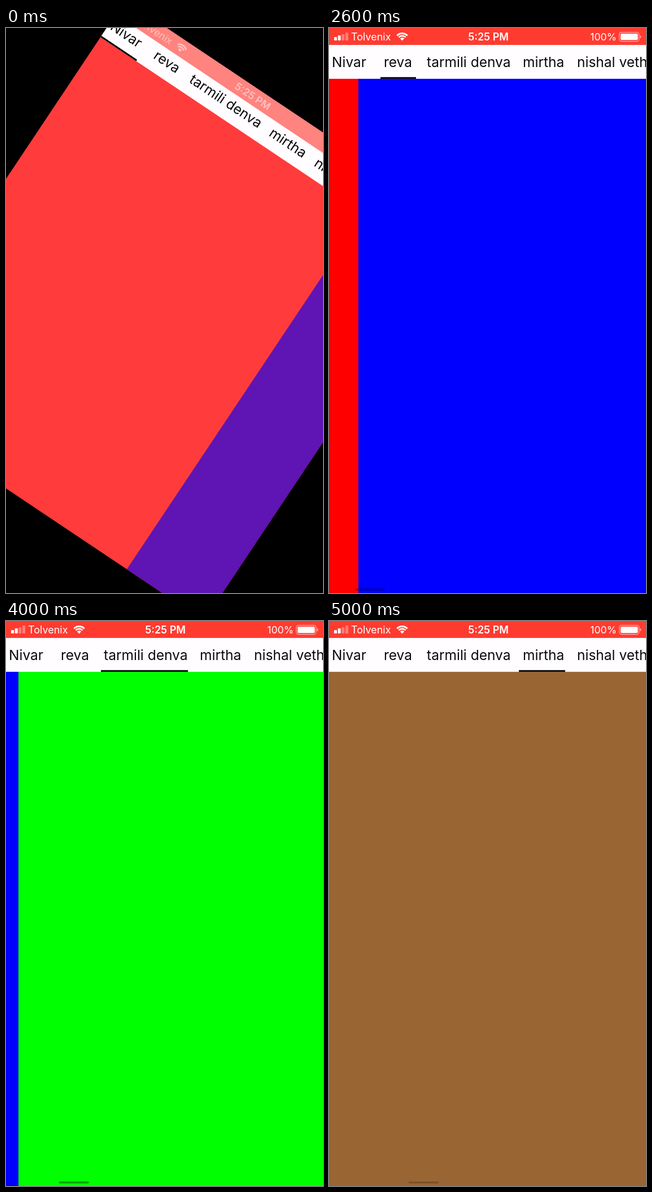
These frames come from a looping animation (561 px wide and 998 px high, 5.1 s). An HTML page with a canvas:

```html
<!DOCTYPE html>
<html>
<head>
<meta charset="utf-8">
<style>
  html, body { margin: 0; width: 100%; height: 100%; overflow: hidden; background: #000; }
  canvas { display: block; }
</style>
</head>
<body>
<canvas id="stage" width="561" height="998"></canvas>
<script>
const ctx = document.getElementById('stage').getContext('2d');
const W = 561, H = 998, LOOP = 5100, STEP = 100;
const PT = W / 375; // one layout point in pixels
const STATUS_H = 20 * PT, TABS_H = 40 * PT, LINE_H = 2 * PT;
const SWIPE_MS = 480, SWIPES = [2265.5, 3615, 4388.8];

// label, text x, underline start, underline end
const TABS = [
  ['Nivar', 5, 0, 76],
  ['reva', 97, 91, 154],
  ['tarmili denva', 173, 168, 322],
  ['mirtha', 343, 336, 418],
  ['nishal vethra', 439, 436, 590],
];
const PAGES = [[255, 0, 0], [0, 0, 255], [0, 255, 0], [153, 102, 51]];
const LANDSCAPE_TINTS = [[255, 157, 157], [253, 54, 56]];

const clamp = v => Math.min(1, Math.max(0, v));
const mix = (a, b, p) => a + (b - a) * p;
const easeOut = s => 1 - (1 - s) ** 2;

function rect(x, y, w, h, fill) {
  ctx.fillStyle = fill;
  ctx.fillRect(x, y, w, h);
}

function pill(x, y, w, h, r, fill) {
  ctx.beginPath();
  ctx.roundRect(x, y, w, h, r);
  ctx.fillStyle = fill;
  ctx.fill();
}

function text(str, x, y, font, fill, align = 'left') {
  ctx.font = font + ' Inter, sans-serif';
  ctx.fillStyle = fill;
  ctx.textAlign = align;
  ctx.fillText(str, x, y);
}

function drawPages(offset, turn, width, height) {
  PAGES.forEach((rgb, i) => {
    const tint = LANDSCAPE_TINTS[i] || rgb;
    const color = rgb.map((c, k) => Math.round(mix(c, tint[k], turn)));
    const left = Math.max(0, Math.round((i - offset) * W));
    if (left < width) rect(left, 0, width - left, height, `rgb(${color})`);
  });
}

function drawTabs(index, progress, width, top) {
  rect(0, 0, width, top + TABS_H, '#fffdff');
  for (const [label, x] of TABS) text(label, x, top + 39, '24.5px', '#0a0a0a');
  const from = TABS[index], to = TABS[index + 1];
  const p = clamp((progress - 0.14) / 0.745);
  const start = mix(from[2], to[2], p), end = mix(from[3], to[3], p);
  rect(start, top + TABS_H - LINE_H, end - start, LINE_H, '#000');
}

function drawStatus(turn, width) {
  ctx.globalAlpha = 1 - turn;
  rect(0, 0, width, STATUS_H, '#ff3b30');
  ctx.globalAlpha = 1 - 1.3 * turn;

  [6, 9, 11, 14].forEach((h, i) => {
    pill(9 + i * 6.7, 22 - h, 5, h, 1, i < 2 ? '#fff' : 'rgba(255,255,255,.35)');
  });
  text('Tolvenix', 39, 22, '18px', '#fff');

  ctx.strokeStyle = '#fff';
  ctx.lineWidth = 2.8;
  for (const r of [12.5, 8.2]) {
    ctx.beginPath();
    ctx.arc(129.5, 22, r, -Math.PI * 0.76, -Math.PI * 0.24);
    ctx.stroke();
  }
  ctx.beginPath();
  ctx.moveTo(129.5, 22.5);
  ctx.arc(129.5, 22, 5, -Math.PI * 0.76, -Math.PI * 0.24);
  ctx.fill();

  text('5:25 PM', 282, 22, '600 18px', '#fff', 'center');
  text('100%', 509, 22, '17.6px', '#fff', 'right');

  ctx.strokeStyle = 'rgba(255,255,255,.6)';
  ctx.lineWidth = 1.2;
  ctx.beginPath();
  ctx.roundRect(513.7, 7.6, 35, 16, 4);
  ctx.stroke();
  pill(516, 10, 30.5, 11.3, 2, '#fff');
  pill(550.4, 13, 1.8, 5, 1, 'rgba(255,255,255,.6)');
  ctx.globalAlpha = 1;
}

function drawScrollbar(offset, age) {
  const alpha = age < 0 ? 0 : 0.36 * clamp((750 - age) / 250);
  pill(4.7 + 45.4 * offset, 990, 53, 3.4, 1.7, `rgba(0,0,0,${alpha})`);
}

function draw(time) {
  // turn: 1 is landscape, 0 is upright
  const turn = 0.375 * (1 - clamp(time / 200)) ** 2;
  const width = mix(W, H, turn), height = mix(H, W, turn);

  const started = SWIPES.filter(s => s <= time).length;
  const index = Math.max(0, started - 1);
  const age = time - SWIPES[index];
  const progress = easeOut(clamp(age / SWIPE_MS));
  const offset = index + progress;

  rect(0, 0, W, H, '#000');
  ctx.save();
  ctx.translate(W / 2, H / 2);
  ctx.rotate(turn * Math.PI / 2);
  ctx.translate(-width / 2, -height / 2);
  drawPages(offset, turn, width, height);
  drawTabs(index, progress, width, STATUS_H * (1 - turn));
  drawStatus(turn, width);
  drawScrollbar(offset, age);
  ctx.restore();
}

function tick() {
  draw(Math.floor(performance.now() % LOOP / STEP) * STEP);
  requestAnimationFrame(tick);
}
tick();
</script>
</body>
</html>
```
